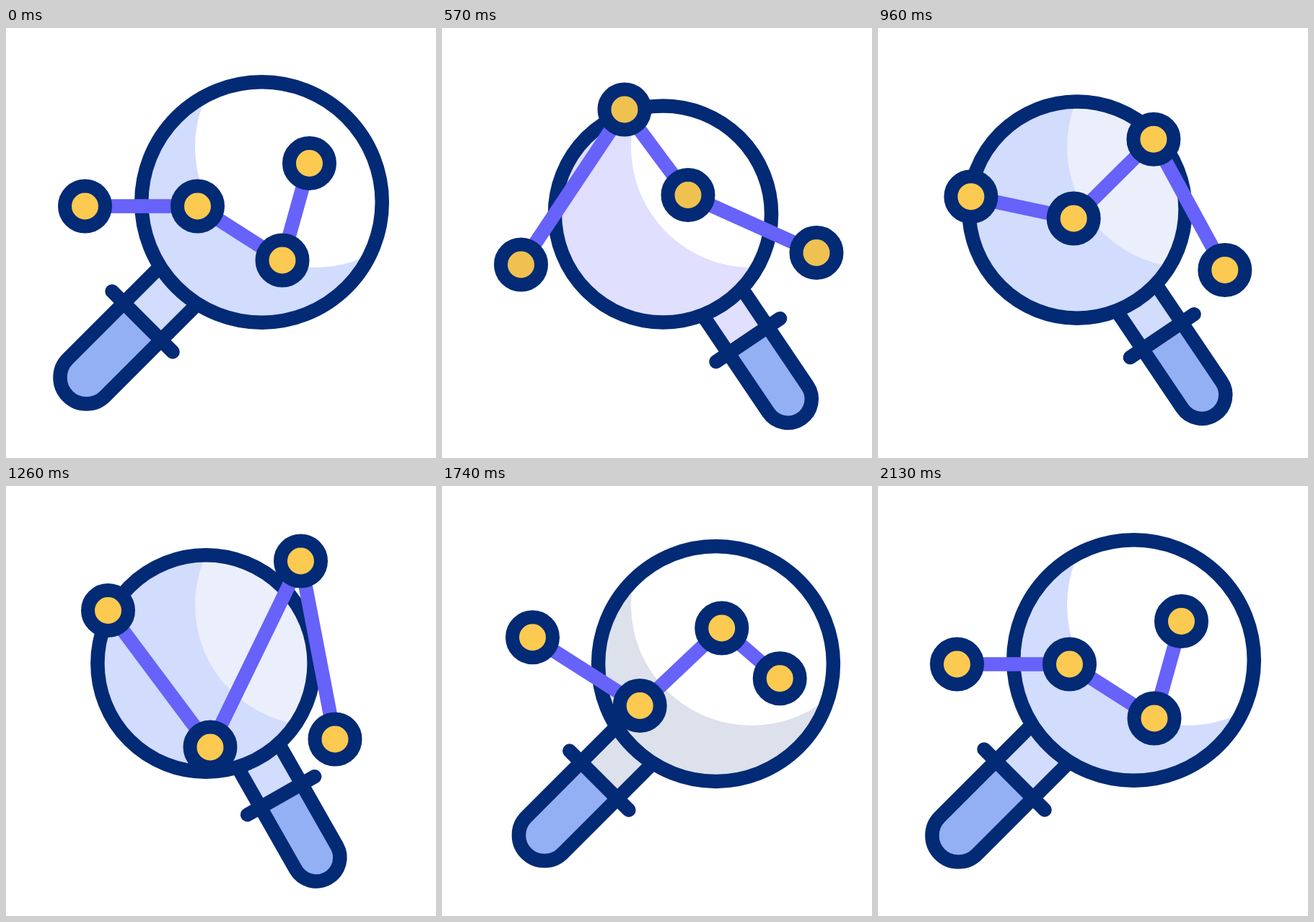
These frames come from a looping animation (596 by 596 pixels, 2.25 s). An HTML page with a canvas:

```html
<!DOCTYPE html>
<html lang="en">
<head>
<meta charset="utf-8">
<title>Chart under a magnifier</title>
<style>
html, body { margin: 0; width: 100%; height: 100%; overflow: hidden; background: #fff; }
canvas { display: block; }
</style>
</head>
<body>
<canvas id="stage" width="596" height="596"></canvas>
<script>
const ctx = document.getElementById('stage').getContext('2d');
const LOOP = 2250, STEP = 30, STROKE = 19.5, RADIUS = 166.75;
const NAVY = '#032a75', VIOLET = '#6762f9', BLUE = '#93b0f4';

// Tracks: [time, ...values], eased between neighbours.
const pivotTrack = [
  [60, 236.6, 359.4], [570, 390.4, 382.4], [720, 390.4, 382.4], [960, 359.9, 376.5],
  [1230, 359.9, 376.5], [1410, 243, 377], [1740, 264.3, 361.7], [2130, 236.6, 359.4]
];
const scaleTrack = [[60, 1], [570, 0.9], [1230, 0.9], [1970, 1]];
const angleTrack = [[60, 135], [300, 56], [1230, 56], [1440, 135]];

// Chart poses (x, y of each node) and the moves between them.
const poses = [
  [[109.5, 247], [265.5, 247], [383, 322], [420.5, 187.5]],
  [[109.5, 328], [253, 113], [341, 231.5], [519, 311.5]],
  [[141.5, 172.5], [283, 362], [408.5, 104], [456, 351]]
];
const bends = [[0, 0], [0, 0], [-8, -16], [30, -2.5]];
const moves = [
  { from: 60, to: 570, linkTo: 520 },
  { from: 720, to: 1140, linkTo: 1140 },
  { from: 1350, to: 2130, linkTo: 2130, bent: true }
];

// Colours that switch at set times.
const paleSteps = [[0, '#d2dcfd'], [420, '#e0dffe'], [750, '#d2dcfd'], [1500, '#dce1eb'], [1920, '#d2dcfd']];
const glossSteps = [[0, '#fff'], [750, '#ebeffc'], [1320, '#fff']];
const goldSteps = [[0, '#fcca50'], [180, '#eec151'], [750, '#fcca50']];

const ease = (t, a, b) => {
  const k = Math.min(1, Math.max(0, (t - a) / (b - a)));
  return k * k * (3 - 2 * k);
};
const mix = (a, b, k) => a + (b - a) * k;
const stepAt = (steps, t) => steps.filter(s => s[0] <= t).pop()[1];

function sample(track, t) {
  const i = Math.max(1, track.findIndex(key => key[0] > t));
  const last = track[track.length - 1];
  if (t >= last[0]) return last.slice(1);
  const a = track[i - 1], b = track[i], k = ease(t, a[0], b[0]);
  return a.slice(1).map((v, j) => mix(v, b[j + 1], k));
}

function chartPoints(t, end) {
  let i = moves.length - 1;
  while (i > 0 && t < moves[i].from) i--;
  const move = moves[i], k = ease(t, move.from, move[end]);
  const next = poses[(i + 1) % poses.length];
  const arc = move.bent ? 4 * k * (1 - k) : 0;
  return poses[i].map((p, n) => p.map((v, j) => mix(v, next[n][j], k) + arc * bends[n][j]));
}

function disc(x, y, r, fill, stroked) {
  ctx.beginPath();
  ctx.arc(x, y, r, 0, 2 * Math.PI);
  if (fill) { ctx.fillStyle = fill; ctx.fill(); }
  if (stroked) ctx.stroke();
}

function drawLens(t) {
  const [px, py] = sample(pivotTrack, t);
  const [s] = sample(scaleTrack, t);
  const angle = sample(angleTrack, t)[0] * Math.PI / 180;
  const r = RADIUS * s, half = 36.5 * s, bar = 234 * s, end = 343.7 * s;
  const cx = px - r * Math.cos(angle), cy = py - r * Math.sin(angle);
  const pale = stepAt(paleSteps, t);

  ctx.strokeStyle = NAVY;
  ctx.lineWidth = STROKE;
  ctx.save();
  ctx.translate(cx, cy);
  ctx.rotate(angle);
  ctx.fillStyle = pale;
  ctx.fillRect(r * 0.9, -half, bar - r * 0.9, 2 * half);
  ctx.beginPath();
  ctx.moveTo(bar, -half);
  ctx.arc(end, 0, half, -Math.PI / 2, Math.PI / 2);
  ctx.lineTo(bar, half);
  ctx.fillStyle = BLUE;
  ctx.fill();
  ctx.beginPath();
  ctx.moveTo(r * 0.95, -half);
  ctx.arc(end, 0, half, -Math.PI / 2, Math.PI / 2);
  ctx.lineTo(r * 0.95, half);
  ctx.stroke();
  ctx.lineCap = 'round';
  ctx.beginPath();
  ctx.moveTo(bar, -59.4 * s);
  ctx.lineTo(bar, 59.4 * s);
  ctx.stroke();
  ctx.restore();

  // The gloss stays put and shows only through the glass.
  disc(cx, cy, r, pale);
  ctx.save();
  ctx.clip();
  disc(429, 165, 167, stepAt(glossSteps, t));
  ctx.restore();
  disc(cx, cy, r, null, true);
}

function drawChart(t) {
  ctx.strokeStyle = VIOLET;
  ctx.lineWidth = STROKE;
  ctx.lineJoin = 'round';
  ctx.beginPath();
  chartPoints(t, 'linkTo').forEach(p => ctx.lineTo(...p));
  ctx.stroke();
  ctx.strokeStyle = NAVY;
  ctx.lineWidth = 19;
  chartPoints(t, 'to').forEach(p => disc(...p, 28, stepAt(goldSteps, t), true));
}

function frame(now) {
  const t = Math.floor((now - start) % LOOP / STEP) * STEP;
  ctx.fillStyle = '#fff';
  ctx.fillRect(0, 0, 596, 596);
  drawLens(t);
  drawChart(t);
  requestAnimationFrame(() => frame(performance.now()));
}

const start = performance.now();
frame(start);
</script>
</body>
</html>
```
